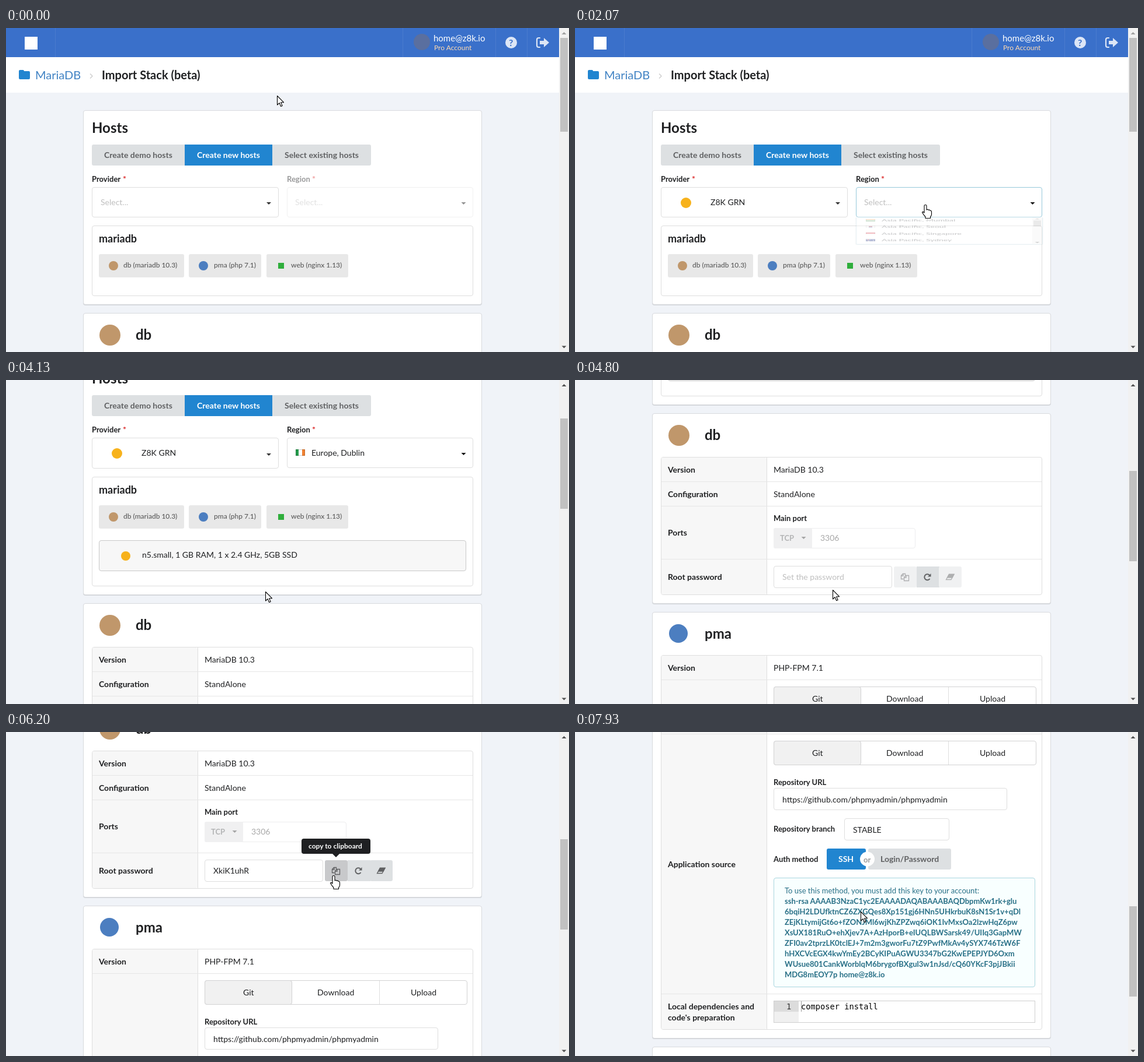
An HTML page that plays this animation: 964 px wide and 556 px high, repeating every 8 s.

```html
<!DOCTYPE html>
<html lang="en">
<head>
<meta charset="utf-8">
<title>Import Stack</title>
<style>
html, body { margin: 0; width: 100%; height: 100%; overflow: hidden; background: #f0f3f8; }
svg { display: block; width: 100%; height: 100%; font-family: Lato, "Open Sans", sans-serif; }
.mono { font-family: "DejaVu Sans Mono", monospace; }
</style>
</head>
<body>
<svg id="stage" viewBox="0 0 964 556"></svg>
<script>
const LOOP = 8000, STEP = 200 / 3;
const INK = '#1f2022', GREY = '#606163', PALE = '#bfbfbf', LINE = '#dedede', ACTIVE = '#96c8da';
const BLUE = '#2185d0', HEAD = '#3a70ca', RED = '#db2828';
const stage = document.getElementById('stage');

function add(parent, tag, attrs = {}, text) {
  const e = document.createElementNS('http://www.w3.org/2000/svg', tag);
  for (const k in attrs) e.setAttribute(k, attrs[k]);
  if (text !== undefined) e.textContent = text;
  parent.appendChild(e);
  return e;
}
const group = (p, attrs) => add(p, 'g', attrs);
const path = (p, d, fill, attrs = {}) => add(p, 'path', { d, fill, ...attrs });
const dot = (p, cx, cy, r, fill) => add(p, 'circle', { cx, cy, r, fill });
const fillRect = (p, x, y, width, height, fill, rx = 0) =>
  add(p, 'rect', { x, y, width, height, fill, rx });
const box = (p, x, y, r, b, fill = '#fff', stroke = LINE, rx = 3.5) =>
  add(p, 'rect', { x: x + .5, y: y + .5, width: r - x - 1, height: b - y - 1, fill, stroke, rx });
// y is the middle of the capitals
const label = (p, x, y, s, size = 14, fill = INK, weight = 400) =>
  add(p, 'text', { x, y: Math.round(y + size * .36), 'font-size': size, fill, 'font-weight': weight }, s);
const bold = (p, x, y, s, size = 14, fill = INK) => label(p, x, y, s, size, fill, 700);
const caret = (p, x, y, fill = '#333', up = 1) =>
  path(p, `M${x - 4} ${y - 2 * up}h8l-4 ${4 * up}z`, fill);
const show = (e, on) => e.setAttribute('display', on ? 'inline' : 'none');
const shift = (e, x, y) => e.setAttribute('transform', `translate(${x} ${y})`);

function card(p, y, b) {
  const g = group(p);
  fillRect(g, 132, y + 1, 683, b - y, '#d3d6da', 4);
  box(g, 132, y, 815, b, '#fff', '#d8dade');
  return g;
}

function table(p, y, lines, b) {
  box(p, 147, y, 800, b, '#fff', LINE);
  fillRect(p, 148, y + 1, 180, b - y - 2, '#f7f7f7', 3);
  fillRect(p, 328, y, 1, b - y, LINE);
  lines.forEach(v => fillRect(p, 148, v, 651, 1, '#e6e6e6'));
}

const FLAGS = {
  india: [[0, 0, 16, 4, '#ef9a3c'], [0, 4, 16, 3, '#fff'], [0, 7, 16, 4, '#2f8a3a']],
  korea: [[0, 0, 16, 11, '#fff'], [5, 2, 6, 4, '#c8323c'], [5, 6, 6, 3, '#2d4f9e']],
  singapore: [[0, 0, 16, 6, '#dc3545'], [0, 6, 16, 5, '#fff']],
  australia: [[0, 0, 16, 11, '#2a3f8f'], [0, 2, 8, 1, '#fff'], [3, 0, 2, 6, '#d65a68'], [4, 8, 2, 2, '#fff'], [12, 2, 1, 1, '#fff'], [12, 7, 2, 2, '#fff']],
  ireland: [[0, 0, 5, 11, '#249a4b'], [5, 0, 6, 11, '#fff'], [11, 0, 5, 11, '#f08232']],
  brazil: [[0, 0, 16, 11, '#2d9a3c'], [4, 3, 8, 5, '#f4dc3c'], [6, 4, 4, 3, '#2c4b9c']],
  usa: [[0, 0, 16, 11, '#fff'], [0, 1, 16, 2, '#d9606a'], [0, 5, 16, 2, '#d9606a'], [0, 9, 16, 2, '#d9606a'], [0, 0, 7, 6, '#4257a5']]
};
function flag(p, x, y, name) {
  FLAGS[name].forEach(([a, b, w, h, c]) => fillRect(p, x + a, y + b, w, h, c));
  add(p, 'rect', { x: x + .5, y: y + .5, width: 15, height: 10, fill: 'none', stroke: 'rgba(0,0,0,.18)' });
}

const page = group(stage);

// top bar and breadcrumb
fillRect(page, 0, 0, 947, 50, HEAD);
[84, 679, 838, 892].forEach(x => fillRect(page, x, 0, 1, 50, '#4a7bce'));
fillRect(page, 32, 15, 22, 22, '#fff');
dot(page, 712, 24, 14, '#5a6f9f');
label(page, 732, 18, 'home@z8k.io', 15, '#fff');
label(page, 733, 34, 'Pro Account', 12, '#ffd9ae');
dot(page, 865, 25, 10, '#dce6f6');
bold(page, 861, 25, '?', 16, HEAD);
path(page, 'M914 17h-2q-3 0-3 3v10q0 3 3 3h2', 'none', { stroke: '#dce6f6', 'stroke-width': 2.2, 'stroke-linecap': 'round' });
path(page, 'M914 22h7v-5l9 8l-9 8v-5h-7z', '#dce6f6');
fillRect(page, 0, 50, 947, 61, '#fff');
path(page, 'M22 74q0-2 2-2h5q2 0 2 2h8q2 0 2 2v10q0 2-2 2h-15q-2 0-2-2z', BLUE);
label(page, 50, 80.5, 'MariaDB', 20, '#4183c4');
path(page, 'M144 78.5l4 4l-4 4', 'none', { stroke: '#ccc', 'stroke-width': 1.3 });
bold(page, 164, 80.5, 'Import Stack (beta)', 20);

// hosts card
const shortCard = card(page, 141, 475), tallCard = card(page, 141, 543);
bold(page, 147, 171, 'Hosts', 24);
fillRect(page, 147, 200, 478, 36, '#dde0e2', 3);
fillRect(page, 306, 200, 150, 36, BLUE);
bold(page, 168, 218, 'Create demo hosts', 14, GREY);
bold(page, 327, 218, 'Create new hosts', 14, '#fff');
bold(page, 477, 218, 'Select existing hosts', 14, GREY);

bold(page, 147, 259, 'Provider', 13);
bold(page, 200, 259, '*', 14, RED);
const providerBox = box(page, 147, 273, 467, 325);
const providerHint = label(page, 162, 299, 'Select...', 14, PALE);
const providerValue = group(page);
dot(providerValue, 190, 300, 9, '#f7b21c');
label(providerValue, 232, 299, 'Z8K GRN');
const providerCaret = group(page);
caret(providerCaret, 450, 301);

const region = group(page);
bold(region, 481, 259, 'Region', 13);
bold(region, 524, 259, '*', 14, RED);
const regionBox = box(region, 481, 273, 800, 325);
const regionHint = label(region, 495, 299, 'Select...', 14, PALE);
const regionValue = group(region);
flag(regionValue, 496, 293, 'ireland');
label(regionValue, 523, 299, 'Europe, Dublin');
caret(region, 783.5, 301, '#111');

const stack = group(page);
const shortStack = box(stack, 147, 339, 800, 460);
const tallStack = group(stack);
box(tallStack, 147, 339, 800, 527);
box(tallStack, 159, 448, 788, 501, '#f7f7f7', '#c9c9c9');
dot(tallStack, 205, 475, 8, '#f7b21c');
label(tallStack, 233, 473, 'n5.small, 1 GB RAM, 1 x 2.4 GHz, 5GB SSD');
bold(stack, 159, 362, 'mariadb', 18);
[[159, 146, 201, 'db (mariadb 10.3)'], [313, 124, 356, 'pma (php 7.1)'], [446, 140, 488, 'web (nginx 1.13)']].forEach(([x, w, tx, s]) => {
  fillRect(stack, x, 388, w, 40, '#e8e8e8', 3);
  label(stack, tx, 407, s, 12, '#5a5a5a', 500);
});
dot(stack, 184, 408, 8, '#c0976b');
dot(stack, 338, 408, 8, '#4c7ec0');
fillRect(stack, 466, 403, 10, 10, '#2fae3c');

// database card
const rest = group(page);
card(rest, 557, 884);
dot(rest, 178, 595, 18, '#c0976b');
bold(rest, 222, 594, 'db', 24);
table(rest, 632, [674, 716, 807], 869);
bold(rest, 159, 654, 'Version');
label(rest, 340, 654, 'MariaDB 10.3');
bold(rest, 159, 696, 'Configuration');
label(rest, 340, 696, 'StandAlone');
bold(rest, 159, 762, 'Ports');
bold(rest, 340, 737, 'Main port', 13);
box(rest, 340, 754, 583, 789, '#fff', '#ededee');
fillRect(rest, 340, 754, 66, 35, '#f0f0f1', 3);
bold(rest, 351, 771, 'TCP', 13, '#b4b5b6');
caret(rest, 391.5, 771, '#a5a5a5');
label(rest, 420, 771, '3306', 14, '#a8a8a8');
bold(rest, 159, 838, 'Root password');
const passBox = box(rest, 340, 819, 543, 857);
const passHint = label(rest, 355, 838, 'Set the password', 14, PALE);
const passValue = label(rest, 355, 838, 'XkiK1uhR');

const TOOL_X = [546, 585, 623], TOOL_W = 39;
const tools = TOOL_X.map((x, i) => {
  const back = fillRect(rest, x, 820, TOOL_W, 36, '#dde0e2', i === 1 ? 0 : 3);
  return { back, icon: group(rest, { fill: 'none', stroke: '#5f6062', 'stroke-width': 1.3 }) };
});
path(tools[0].icon, 'M562.5 841.5h-4v-6l3-3h4v3M562 832.5v3.5h-3.5M563.5 838.5l3-3h5v9h-8zM567 835.5v3.5h-3.5', 'none');
path(tools[1].icon, 'M607.5 841a5 5 0 1 1-.6-6.2', 'none', { 'stroke-width': 2 });
path(tools[1].icon, 'M609.5 832v5.5h-5.5z', '#5f6062', { stroke: 'none' });
path(tools[2].icon, 'M640.5 833.5h8.5l-5 9h-8.5z', 'none');
path(tools[2].icon, 'M640.5 833.5h8.5l-3 5.5h-8.5z', '#5f6062');

const tip = group(rest);
fillRect(tip, 506, 783, 118, 26, '#1f2022', 4);
path(tip, 'M559 809h12l-6 6z', '#1f2022');
bold(tip, 518, 796, 'copy to clipboard', 12, '#fff');

// application card
card(rest, 898, 1537);
dot(rest, 177, 935, 16, '#4c7ec0');
bold(rest, 222, 935, 'pma', 24);
table(rest, 972, [1014, 1460], 1522);
bold(rest, 159, 994, 'Version');
label(rest, 340, 994, 'PHP-FPM 7.1');
bold(rest, 159, 1238, 'Application source');
box(rest, 340, 1026, 790, 1068, '#fff', '#d2d2d3');
box(rest, 340, 1026, 490, 1068, '#f1f1f1', '#d2d2d3');
fillRect(rest, 639, 1027, 1, 40, LINE);
label(rest, 406, 1047, 'Git');
label(rest, 533, 1047, 'Download');
label(rest, 693, 1047, 'Upload');
bold(rest, 340, 1097, 'Repository URL', 13);
box(rest, 340, 1107, 740, 1145);
label(rest, 355, 1127, 'https://github.com/phpmyadmin/phpmyadmin');
bold(rest, 340, 1177, 'Repository branch', 13);
box(rest, 461, 1159, 641, 1197);
label(rest, 476, 1179, 'STABLE');
bold(rest, 340, 1229, 'Auth method', 13);
fillRect(rest, 431, 1211, 67, 36, BLUE, 3);
fillRect(rest, 502, 1211, 142, 36, '#dde0e2', 3);
dot(rest, 500.5, 1229, 12.5, '#fff');
bold(rest, 494, 1230, 'or', 13, '#9b9b9b');
bold(rest, 451, 1229, 'SSH', 14, '#fff');
bold(rest, 523, 1229, 'Login/Password', 14, GREY);
box(rest, 340, 1261, 788, 1449, '#f8ffff', '#a9d5de');
label(rest, 359, 1283, 'To use this method, you must add this key to your account:', 13, '#276f86');
[
  'ssh-rsa AAAAB3NzaC1yc2EAAAADAQABAAABAQDbpmKw1rk+glu',
  '6bqiH2LDUfktnCZ6ZXGQes8Xp151gj6HNn5UHkrbuK8sN1Sr1v+qDl',
  'ZEjKLtymijGt6o+fZONJMl6wjKhZPZwq6iOK1IvMxsOa2lzwHqZ6pw',
  'XsUX181RuO+ehXjev7A+AzHporB+eIUQLBWSarsk49/UIIq3GapMW',
  'ZFI0av2tprzLK0tclEJ+7m2m3gworFu7tZ9PwfMkAv4ySYX746TzW6F',
  'hHXCVcEGX4kwYmEy2BCyKIPuAGWU3347bG2KwEPEPJYD6Oxm',
  'WUsue801CankWorblqM6brygofBXgul3w1nJsd/cQ60YKcF3pjJBkii',
  'MDG8mEOY7p home@z8k.io'
].forEach((s, i) => bold(rest, 359, 1301 + 18 * i, s, 13, '#276f86'));
bold(rest, 159, 1482, 'Local dependencies and');
bold(rest, 159, 1501, "code's preparation");
box(rest, 340, 1472, 788, 1510, '#fff', '#cfcfcf', 0);
fillRect(rest, 341, 1473, 42, 36, '#f0f0f0');
fillRect(rest, 341, 1473, 42, 18, '#dcdcdc');
fillRect(rest, 387, 1473, 1, 18, '#999');
label(rest, 362, 1482, '1', 13.7, '#333').setAttribute('class', 'mono');
label(rest, 387, 1482, 'composer install', 13.7, '#000').setAttribute('class', 'mono');
card(rest, 1551, 1842);

// dropdown lists, joined to the field above
function menu(x, b, w) {
  const g = group(page);
  fillRect(g, x - 1, 326, w + 2, b - 323, 'rgba(34,36,38,.08)', 4);
  fillRect(g, x, 325, w, b - 324, 'rgba(34,36,38,.14)', 4);
  box(g, x, 323, x + w, b, '#fff', ACTIVE, 2);
  fillRect(g, x + 1, 322, w - 2, 4, '#fff');
  return g;
}
function menuBar(p, x, b) {
  fillRect(p, x, 325, 17, b - 326, '#f1f1f1');
  caret(p, x + 8.5, 333, '#8a8a8a', -1);
  caret(p, x + 8.5, b - 9, '#444');
}

const providerMenu = menu(147, 474, 320);
menuBar(providerMenu, 449, 473);
fillRect(providerMenu, 451, 341, 13, 90, '#c1c1c1');
fillRect(providerMenu, 148, 375, 301, 1, '#f4f4f4');
fillRect(providerMenu, 148, 426, 301, 1, '#f4f4f4');
[['Z8K GRN', 9, '#f7b21c'], ['Z8K QV', 14, '#1f8ceb'], ['My Tolma', 8, '#56657a']].forEach(([s, r, c], i) => {
  dot(providerMenu, 192, 350 + 51 * i, r, c);
  label(providerMenu, 234, 349 + 51 * i, s);
});

const regionMenu = menu(481, 464, 320);
const clip = add(stage, 'clipPath', { id: 'view' });
fillRect(clip, 482, 325, 301, 138, '#000');
const list = group(group(regionMenu, { 'clip-path': 'url(#view)' }));
const rowHover = fillRect(list, 482, 460, 301, 35, '#f7f7f7');
const rows = [
  ['india', 'Asia Pacific, Mumbai'], ['korea', 'Asia Pacific, Seoul'],
  ['singapore', 'Asia Pacific, Singapore'], ['australia', 'Asia Pacific, Sydney'],
  ['ireland', 'Europe, Dublin'], ['brazil', 'South America, Sao Paulo'],
  ['usa', 'North America, N. Virginia']
].map(([f, s], i) => {
  const y = 340 + 34.33 * i;
  flag(list, 498, Math.round(y) - 6, f);
  return label(list, 525, y, s, 14, '#55565a');
});
menuBar(regionMenu, 783, 463);
const listThumb = fillRect(regionMenu, 785, 341, 13, 30, '#c1c1c1');

// window scrollbar
fillRect(stage, 947, 0, 17, 556, '#f1f1f1');
const upArrow = group(stage);
caret(upArrow, 955.5, 9, '#505050', -1);
caret(stage, 955.5, 547.5, '#505050');
const thumb = fillRect(stage, 949, 17, 13, 161, '#c1c1c1');

// pointers, tip at 0,0
const outline = { stroke: '#000', 'stroke-width': 1.1, 'stroke-linejoin': 'round' };
const arrow = path(stage, 'M.5 .5v15.5l3.6-3.4l2.5 5.9l2.5-1.1l-2.5-5.7h4.9z', '#fff', outline);
const hand = path(stage, 'M-2 2Q-2 .5 0 .5T2 2V9Q4 7.5 5.5 9.5Q7.5 8.5 8.5 10.5Q10.5 10 10.5 13V17Q10.5 19 8.5 21V23.5H0V21Q-3 18-5.5 13.5Q-5 11-2 14Z', '#fff', outline);

const POINTER = [
  [60, 464, 116], [330, 388, 308], [860, 388, 308], [1066, 388, 321], [1500, 386, 345], [1650, 386, 345],
  [2000, 600, 303], [2130, 600, 303], [2400, 600, 449], [2460, 600, 449], [2860, 584, 395], [3250, 584, 395],
  [3660, 444, 363], [4140, 444, 363], [4800, 441, 360], [5080, 441, 360], [5400, 604, 240], [5730, 604, 240],
  [6130, 561, 246], [6380, 561, 246], [6660, 657, 274], [6860, 657, 274], [7330, 489, 308]
];
const SCROLL = [[3750, 0], [4133.3, 174], [4800, 500], [4870, 500], [5100, 600], [6810, 600], [7330, 800], [7470, 800], [7933, 1011]];
const LIST = [[2460, 0], [2800, 91]];
const PROVIDER_OPEN = [[730, 0], [930, 1], [1600, 1], [1800, 0]];
const REGION_OPEN = [[2000, 0], [2200, 1], [3200, 1], [3400, 0]];
const TIP = [[5950, 0], [6100, 1], [6800, 1], [6870, 0]];
const smooth = u => u * u * (3 - 2 * u);

function at(keys, t, col = 1, ease = u => u) {
  const i = keys.findIndex(k => k[0] > t);
  if (i < 0) return keys[keys.length - 1][col];
  if (i === 0) return keys[0][col];
  const a = keys[i - 1], b = keys[i];
  return a[col] + (b[col] - a[col]) * ease((t - a[0]) / (b[0] - a[0]));
}

function unfold(e, v) {
  show(e, v > 0);
  e.setAttribute('opacity', v);
  e.setAttribute('transform', `translate(0 ${325 * (1 - v)}) scale(1 ${v})`);
}

function draw(time) {
  const t = Math.floor((time + 5) / STEP) * STEP + .01;
  const chosen = t >= 1600, grown = t >= 3200, filled = t >= 5560;
  const scroll = Math.round(at(SCROLL, t));
  const x = Math.round(at(POINTER, t, 1, smooth)), y = Math.round(at(POINTER, t, 2, smooth));

  shift(page, 0, -scroll);
  shift(stack, 0, grown ? 1 : 0);
  shift(rest, 0, grown ? 0 : -68);
  [shortCard, shortStack].forEach(e => show(e, !grown));
  [tallCard, tallStack, regionValue].forEach(e => show(e, grown));
  providerBox.setAttribute('height', grown ? 52 : 51);
  shift(providerCaret, 0, grown ? 1 : 0);
  show(providerHint, !chosen);
  show(providerValue, chosen);
  show(regionHint, !grown);
  region.setAttribute('opacity', chosen ? 1 : .45);

  const p = at(PROVIDER_OPEN, t), r = at(REGION_OPEN, t);
  unfold(providerMenu, p);
  unfold(regionMenu, r);
  providerBox.setAttribute('stroke', p > 0 ? ACTIVE : LINE);
  regionBox.setAttribute('stroke', r > 0 ? ACTIVE : LINE);

  const offset = at(LIST, t), picked = offset > 85;
  shift(list, 0, -offset);
  show(rowHover, picked);
  rows[4].setAttribute('font-weight', picked ? 700 : 400);
  rows[4].setAttribute('fill', picked ? '#333' : '#55565a');
  listThumb.setAttribute('y', 341 + Math.round(offset * .21));

  show(passHint, !filled);
  show(passValue, filled);
  passBox.setAttribute('stroke', t >= 6400 ? '#85b7d9' : LINE);
  const py = y + scroll;
  tools.forEach(({ back, icon }, i) => {
    const on = filled || i === 1, left = TOOL_X[i];
    const over = on && x >= left && x < left + TOOL_W && py > 820 && py < 856;
    back.setAttribute('fill', over ? '#c8c9cb' : on ? '#dde0e2' : '#f0f1f2');
    icon.setAttribute('opacity', on ? 1 : .45);
  });
  tip.setAttribute('opacity', at(TIP, t));

  const total = grown ? 1872 : 1804;
  thumb.setAttribute('height', Math.round(522 * 556 / total));
  thumb.setAttribute('y', 17 + Math.round(522 * scroll / total));
  upArrow.setAttribute('opacity', scroll ? 1 : .5);

  const pointing = t > 260 && t < 3400 || t > 5320 && t < 6500;
  show(hand, pointing);
  show(arrow, !pointing);
  shift(hand, x, y);
  shift(arrow, x, y);
}

const start = performance.now();
function tick() {
  draw((performance.now() - start) % LOOP);
  requestAnimationFrame(tick);
}
tick();
</script>
</body>
</html>
```
